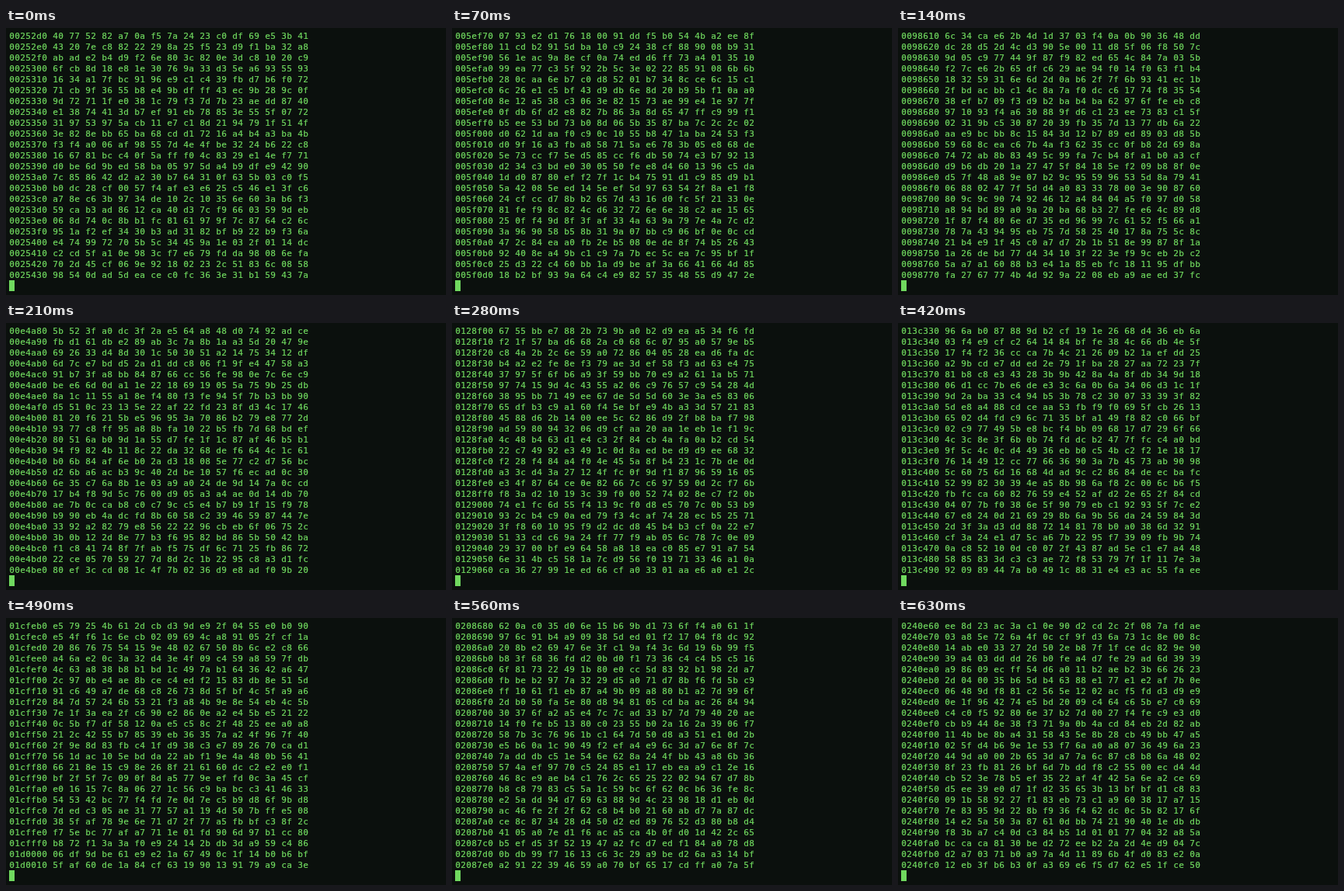
These frames come from a looping animation (566x344 px, 0.7 s). An HTML page:

```html
<!DOCTYPE html>
<html lang="en">
<head>
<meta charset="utf-8">
<title>Hex dump</title>
<style>
  html, body { margin: 0; height: 100%; overflow: hidden; background: #0b100d; }
  svg { display: block; width: 566px; height: 344px; fill: #70d95f; }
  text {
    font: 11px "DejaVu Sans Mono", monospace;
    letter-spacing: calc(7px - 1ch);
    white-space: pre;
    stroke: #70d95f;
    stroke-width: .2px;
  }
</style>
</head>
<body>
<svg viewBox="0 0 566 344"><rect x="4" y="325" width="7" height="14"/></svg>
<script>
const STEP = 70, ROWS = 23, PITCH = 14;
const starts = [0x252d0, 0x5ef70, 0x98610, 0xe4a80, 0x128f00,
                0x132910, 0x13c330, 0x1cfeb0, 0x208680, 0x240e60];

const svg = document.querySelector("svg");
const lines = Array.from({ length: ROWS }, (_, row) => {
  const line = document.createElementNS(svg.namespaceURI, "text");
  line.setAttribute("x", 4.3);
  line.setAttribute("y", 14 + row * PITCH);
  return svg.appendChild(line);
});

const hex = (n, width) => n.toString(16).padStart(width, "0");

// The byte stored at an address: an integer hash, the same on every pass
function byteAt(address) {
  let h = Math.imul(address ^ 0x5bd1e995, 0x9e3779b1);
  h = Math.imul(h ^ (h >>> 15), 0x85ebca6b);
  return (h ^ (h >>> 13)) >>> 24;
}

function dump(address) {
  const bytes = Array.from({ length: 16 }, (_, i) => hex(byteAt(address + i), 2));
  return [hex(address, 7), ...bytes].join(" ");
}

let shown = -1;
function draw() {
  const page = Math.floor(performance.now() / STEP) % starts.length;
  if (page !== shown) {
    shown = page;
    lines.forEach((line, row) => line.textContent = dump(starts[page] + row * 16));
  }
  requestAnimationFrame(draw);
}
draw();
</script>
</body>
</html>
```
